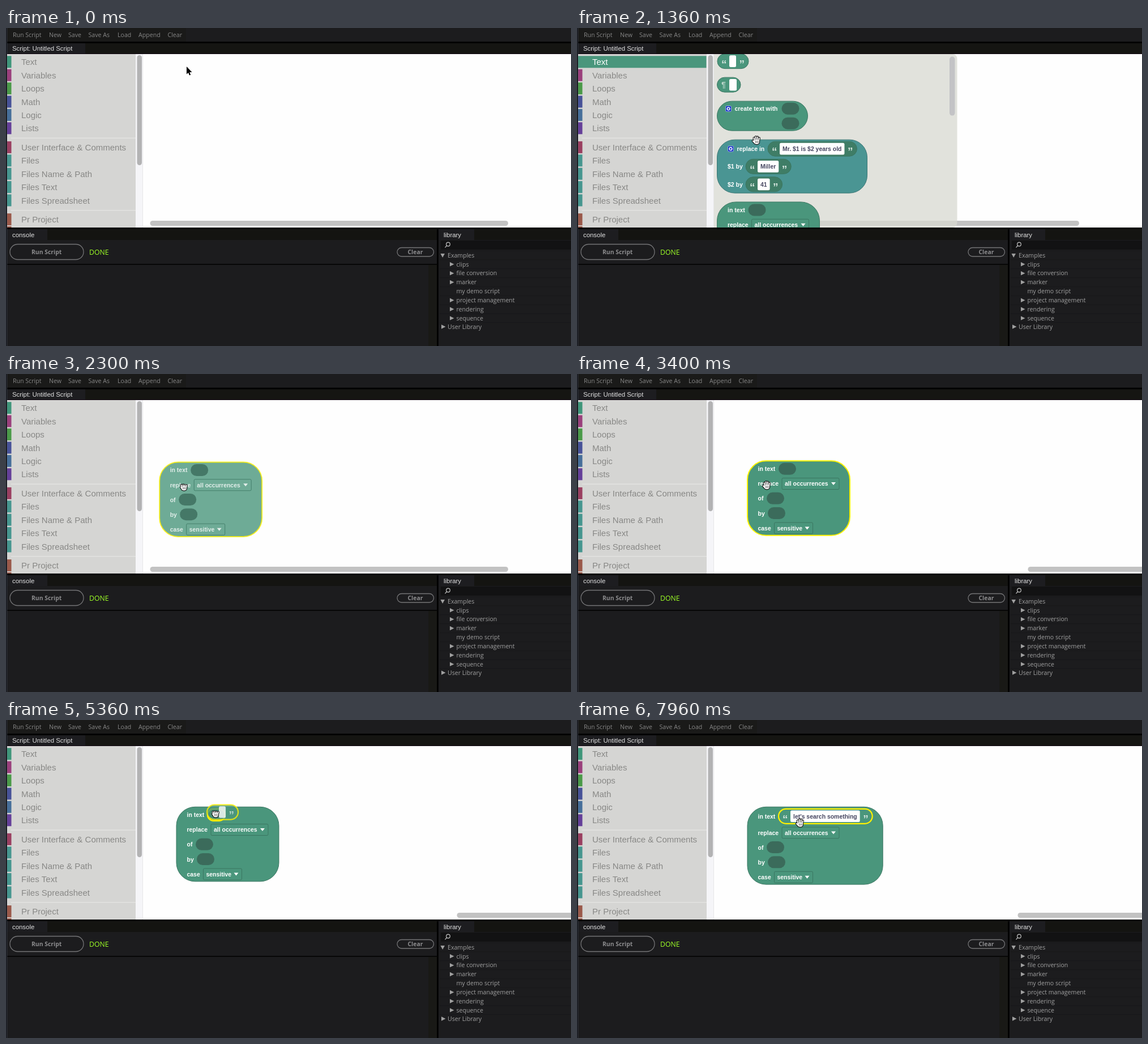
These frames come from a looping animation (998x561 px, 8000 ms). An HTML page with a canvas:

```html
<!DOCTYPE html>
<html lang="en">
<head>
<meta charset="utf-8">
<title>Block script editor</title>
<style>
html, body { margin: 0; width: 100%; height: 100%; overflow: hidden; background: #1c1c1e; }
canvas { display: block; width: 100vw; height: 100vh; }
</style>
</head>
<body>
<canvas id="stage" width="998" height="561"></canvas>
<script>
const ctx = document.getElementById('stage').getContext('2d');
const LOOP = 8000;
const SANS = '"Liberation Sans", Arial, sans-serif';
const UI = '"Open Sans", "Noto Sans", sans-serif';
const BLOCK_FONT = `bold 10.45px ${SANS}`;
const GREEN = '#4a967c', GREEN_EDGE = '#3a7661', SLOT = '#3b6b5b', TEAL = '#4a9593', YELLOW = '#fff200';
const PHRASE = "let's search something";

const clamp = v => Math.max(0, Math.min(1, v));
const progress = (t, from, to) => clamp((t - from) / (to - from));
const smooth = p => p * p * (3 - 2 * p);

// Position along [time, x, y] keys.
function along(keys, t, ease = p => p) {
  const next = keys.findIndex(k => k[0] > t);
  if (next === 0) return keys[0].slice(1);
  if (next < 0) return keys[keys.length - 1].slice(1);
  const a = keys[next - 1], b = keys[next];
  const p = ease(progress(t, a[0], b[0]));
  return [a[1] + (b[1] - a[1]) * p, a[2] + (b[2] - a[2]) * p];
}

function rect(x, y, w, h, fill) {
  ctx.fillStyle = fill;
  ctx.fillRect(x, y, w, h);
}

function round(x, y, w, h, r, fill, stroke, width = 1) {
  ctx.beginPath();
  ctx.roundRect(x, y, w, h, r);
  if (fill) { ctx.fillStyle = fill; ctx.fill(); }
  if (stroke) { ctx.strokeStyle = stroke; ctx.lineWidth = width; ctx.stroke(); }
}

// Text whose capitals are centred on y.
function text(str, x, y, font, fill) {
  ctx.font = font;
  ctx.fillStyle = fill;
  ctx.fillText(str, x, y + parseFloat(font.match(/[\d.]+(?=px)/)) * 0.36);
}

function poly(points, fill) {
  ctx.beginPath();
  points.forEach(([x, y]) => ctx.lineTo(x, y));
  ctx.closePath();
  ctx.fillStyle = fill;
  ctx.fill();
}

const label = (str, x, y) => text(str, x, y, BLOCK_FONT, '#fff');
const slot = (x, y) => round(x, y - 10.5, 31, 21, 10.5, SLOT);

function measure(str) {
  ctx.font = BLOCK_FONT;
  return ctx.measureText(str).width;
}

const quoteWidth = str => 43 + Math.max(12, str ? measure(str) + 10 : 0);

function quoteBlock(x, cy, str, { fill = GREEN, selected = false, caret = false } = {}) {
  const w = quoteWidth(str), mark = `bold 19px ${SANS}`;
  round(x, cy - 13, w, 26, 13, fill, selected ? YELLOW : GREEN_EDGE, selected ? 2.2 : 1);
  text('“', x + 7, cy + 4.5, mark, '#d6e6df');
  text('”', x + w - 16.5, cy + 4.5, mark, '#d6e6df');
  round(x + 21, cy - 10.3, w - 43, 20.6, 2.5, '#fff');
  text(str, x + 26, cy, BLOCK_FONT, '#454560');
  if (caret) rect(x + 26 + measure(str), cy - 6, 1, 12, '#333');
}

function dropdown(str, x, cy, w) {
  round(x, cy - 10, w, 20, 2, null, GREEN_EDGE);
  label(str, x + 5, cy);
  const ax = x + w - 10;
  poly([[ax - 4, cy - 2.5], [ax + 4, cy - 2.5], [ax, cy + 2.5]], '#fff');
}

// typed === null leaves the first input empty.
function replaceBlock(x, y, { selected = false, typed = null, alpha = 1, quote = {} } = {}) {
  const grow = typed === null ? 0 : 5.3;
  const w = typed === null ? 181 : Math.max(181, 73.5 + quoteWidth(typed));
  ctx.globalAlpha = alpha;
  round(x, y, w, 131.5 + grow, 33, GREEN, selected ? YELLOW : GREEN_EDGE, selected ? 2 : 1);
  label('in text', x + 18.5, y + 14 + grow / 2);
  if (typed === null) slot(x + 55, y + 14);
  else quoteBlock(x + 55, y + 16.5, typed, quote);
  y += grow;
  label('replace', x + 18.5, y + 40.3);
  dropdown('all occurrences', x + 61, y + 40.3, 101);
  label('of', x + 18.5, y + 66.4);
  slot(x + 34, y + 66);
  label('by', x + 18.5, y + 92.6);
  slot(x + 36, y + 92.2);
  label('case', x + 18.5, y + 118.7);
  dropdown('sensitive', x + 47.5, y + 118.7, 68);
  ctx.globalAlpha = 1;
}

function gear(x, y) {
  round(x - 5, y - 5, 10, 10, 2, '#1a35c8', '#a9b8e8', 0.8);
  ctx.beginPath();
  ctx.arc(x, y, 2.3, 0, 7);
  ctx.strokeStyle = '#fff';
  ctx.lineWidth = 1.5;
  ctx.stroke();
}

function flyout(scroll, quoteSelected) {
  round(242, 46, 429.5, 306, [0, 8, 8, 0], 'rgba(215,216,208,.75)');
  ctx.save();
  ctx.translate(0, -scroll);
  quoteBlock(248, 66, '', { selected: quoteSelected });
  round(247.5, 94.5, 41.5, 26, 13, GREEN, GREEN_EDGE);
  text('¶', 255, 107.5, `bold 14px ${SANS}`, '#b9d5ca');
  round(269, 97.3, 13, 20.6, 2.5, '#fff');

  round(247.5, 136.5, 160, 52, 26, GREEN, GREEN_EDGE);
  gear(267.5, 149.8);
  label('create text with', 278.5, 149.8);
  slot(361.5, 149.5);
  slot(361.5, 175.5);

  round(247.5, 204.5, 265, 94, 31, TEAL, '#3a7674');
  gear(271.5, 220.5);
  label('replace in', 282.5, 220.8);
  label('$1 by', 266, 252);
  label('$2 by', 266, 283.5);
  const nested = { fill: '#3f7d66' };
  quoteBlock(337, 220.5, 'Mr. $1 is $2 years old', nested);
  quoteBlock(298, 251.7, 'Miller', nested);
  quoteBlock(298, 283.2, '41', nested);

  replaceBlock(247.5, 314.3);
  replaceBlock(247.5, 462.3);
  ctx.restore();
  round(658, 48 + scroll * 0.34, 9.5, 104, 4.7, '#c3c3c6');
}

const CATEGORIES = [
  ['Text', 60, '#3f967a'], ['Variables', 83.4, '#9a3f7c'], ['Loops', 106.8, '#4a9a48'],
  ['Math', 130.2, '#475298'], ['Logic', 153.6, '#466f9a'], ['Lists', 177, '#653f99'],
  ['User Interface & Comments', 210.6, '#9a3f60'], ['Files', 234, '#46968f'],
  ['Files Name & Path', 257.4, '#46968f'], ['Files Text', 280.8, '#46968f'],
  ['Files Spreadsheet', 304.2, '#46968f'], ['Pr Project', 337.8, '#9a594a'], ['', 360.5, '#9a594a']
];

function toolbox(open) {
  rect(2, 46, 227, 306, '#d5d5d3');
  rect(229, 46, 13, 306, '#f5f5f8');
  rect(241, 46, 1, 306, '#e6e6e8');
  round(231.5, 48, 8.5, 194, 4.2, '#b3b3b4');
  rect(9, 193.5, 220, 1.5, '#e3e3e1');
  rect(9, 321, 220, 1.5, '#e3e3e1');
  CATEGORIES.forEach(([name, y, color], i) => {
    const active = open && i === 0;
    rect(2, y - 10.7, active ? 226.5 : 7.5, 21, active ? GREEN : color);
    text(name, 27, y, `15px ${SANS}`, active ? '#fff' : '#888886');
  });
}

function tab(str, x, y, w, h) {
  rect(x, y, w, h, '#1d1d20');
  text(str, x + 9, y + h / 2, `11.4px ${SANS}`, '#e2e2e2');
}

const TREE = ['clips', 'file conversion', 'marker', 'my demo script', 'project management', 'rendering', 'sequence'];

function chrome() {
  rect(0, 0, 998, 561, '#1c1c1e');
  const small = `10.6px ${UI}`, bold = `bold 10.4px ${UI}`;
  rect(2, 0, 316, 24, '#1a1a19');
  [['Run Script', 12], ['New', 76], ['Save', 110], ['Save As', 145.5], ['Load', 197], ['Append', 234], ['Clear', 285.5]]
    .forEach(([name, x]) => text(name, x, 12, small, '#868686'));
  rect(0, 24, 998, 3, '#030303');
  rect(0, 27, 998, 18, '#151512');
  tab('Script: Untitled Script', 2, 27, 138, 18);
  rect(0, 45, 998, 1, '#100510');

  rect(0, 352, 998, 3, '#030303');
  rect(0, 355, 998, 19, '#141411');
  tab('console', 2, 355, 71, 19);
  round(7, 381.5, 130, 27, 13.5, null, '#747476', 1.3);
  text('Run Script', 45, 395, bold, '#8c8c8e');
  text('DONE', 147, 395.3, `12.3px ${UI}`, '#9dff26');
  round(691, 387.5, 64.5, 15.5, 7.75, null, '#747476', 1.3);
  text('Clear', 709.5, 395, bold, '#8c8c8e');
  rect(0, 416, 761, 2, '#070707');
  rect(746, 418, 15, 143, '#191916');

  rect(761, 352, 3, 209, '#030303');
  tab('library', 764, 355, 63, 19);
  rect(768, 375, 230, 16, '#121213');
  ctx.strokeStyle = '#c4c4c4';
  ctx.lineWidth = 1.2;
  ctx.beginPath();
  ctx.arc(781, 381.5, 3.3, 0, 7);
  ctx.moveTo(778.6, 384);
  ctx.lineTo(775.5, 387.3);
  ctx.stroke();

  const gray = '#a0a0a0';
  const rightArrow = (x, y) => poly([[x, y - 3.7], [x + 7.5, y], [x, y + 3.7]], gray);
  for (let i = 0; i < 9; i++) rect(766, 392.5 + i * 15.85, 232, 1, '#18181a');
  poly([[767.5, 398], [775, 398], [771.2, 405]], gray);
  text('Examples', 780, 401, small, gray);
  TREE.forEach((name, i) => {
    const y = 416.8 + i * 15.85;
    if (i !== 3) rightArrow(784, y);
    text(name, 795.5, y, small, gray);
  });
  rightArrow(769, 527);
  text('User Library', 780, 527, small, gray);
  rect(0, 0, 1, 561, '#0a0a0c');
  rect(1, 0, 1, 561, '#343a45');
}

function arrow(x, y) {
  ctx.beginPath();
  [[0, 0], [0, 13.5], [3, 10.8], [5, 15.5], [7.2, 14.5], [5.2, 10], [9.5, 10]]
    .forEach(([dx, dy]) => ctx.lineTo(x + dx, y + dy));
  ctx.closePath();
  ctx.lineJoin = 'round';
  ctx.lineWidth = 2;
  ctx.strokeStyle = '#fff';
  ctx.stroke();
  ctx.fillStyle = '#000';
  ctx.fill();
}

function hand(x, y, closed) {
  const lift = closed ? 3.2 : 0;
  const fingers = [[-4.3, -4 + lift / 2], [-1.3, -6 + lift], [1.8, -5.6 + lift], [4.8, -3.6 + lift / 2]];
  ctx.save();
  ctx.translate(x, y);
  ctx.lineCap = 'round';
  for (const [color, width, palm] of [['#111', 4.2, 5.6], ['#fff', 2, 4.4]]) {
    ctx.strokeStyle = ctx.fillStyle = color;
    ctx.lineWidth = width;
    ctx.beginPath();
    fingers.forEach(([fx, fy]) => { ctx.moveTo(fx, fy); ctx.lineTo(fx * 0.8, 2); });
    ctx.moveTo(closed ? -5 : -6.2, 1.2);
    ctx.lineTo(-2.5, 5);
    ctx.stroke();
    ctx.beginPath();
    ctx.ellipse(0.4, 3.2, palm, palm - 0.6, 0, 0, 7);
    ctx.fill();
  }
  ctx.strokeStyle = '#333';
  ctx.lineWidth = 0.8;
  ctx.beginPath();
  for (const fx of [-1.5, 0.7, 2.9]) { ctx.moveTo(fx, 1.5); ctx.lineTo(fx, 4.5); }
  ctx.stroke();
  ctx.restore();
}

const POINTER = [
  [0, 319, 68], [300, 132, 61], [830, 132, 61], [1300, 317, 198], [1760, 317, 198],
  [1960, 281, 204], [2100, 281, 204], [2300, 314, 198.5], [2440, 335.5, 196.5],
  [3400, 335.5, 196.5], [3900, 122, 59], [4300, 122, 59], [4730, 262, 67], [4930, 262, 67],
  [5100, 304, 125], [5360, 370, 164.5], [5430, 373, 167], [5900, 373, 167], [6000, 383, 171],
  [7800, 391, 173], [7960, 394, 181.5]
];
const BLOCK_PATH = [[2100, 247, 160], [2300, 271, 155.5], [2460, 301, 153.3]];
const QUOTE_PATH = [[4930, 248, 66], [5100, 289, 124], [5360, 355, 162.5], [5430, 359, 166]];

function pointer(t) {
  if (t >= 6600 && t < 7800) return;
  const [x, y] = along(POINTER, t, t < 2100 ? smooth : undefined);
  const overBlocks = t < 2100 ? t > 830 && x > 242
    : t < 4130 ? x > 301
    : x > 242;
  const closed = (t > 2060 && t < 3100) || (t > 4780 && t < 5900);
  if (overBlocks) hand(x, y, closed);
  else arrow(x, y);
}

function workspace(t) {
  rect(242, 46, 756, 306, '#fefefe');
  const chars = Math.round(PHRASE.length * progress(t, 6570, 7660));
  const typed = t < 5660 ? null : PHRASE.slice(0, chars);
  const widened = typed ? Math.max(0, quoteWidth(typed) - 107.5) : 0;
  const barX = t < 2800 ? 254.5 : 796.5 - widened * 0.31;
  round(barX, 340, 632.5, 9, 4.5, '#c2c2c2');

  if (t >= 2100) {
    const [x, y] = along(BLOCK_PATH, t);
    const editing = t >= 6230 && t < 7800;
    replaceBlock(x, y, {
      selected: t < 4130,
      alpha: t < 2800 ? 0.8 : 1,
      typed,
      quote: { selected: true, caret: editing }
    });
  }

  const open = (t >= 500 && t < 2100) || (t >= 4130 && t < 4930);
  if (open) flyout(t < 2100 ? 154 * smooth(progress(t, 1320, 1630)) : 0, t >= 4780);

  if (t >= 4930 && t < 5660) {
    const [x, cy] = along(QUOTE_PATH, t);
    if (t > 5250) round(356, 156.8, 31, 21, 10.5, null, YELLOW, 2.5);
    ctx.globalAlpha = 0.8;
    quoteBlock(x, cy, '', { selected: true });
    ctx.globalAlpha = 1;
  }
  return open;
}

function frame(now) {
  const t = now % LOOP;
  chrome();
  ctx.save();
  ctx.beginPath();
  ctx.rect(2, 46, 996, 306);
  ctx.clip();
  const open = workspace(t);
  toolbox(open);
  ctx.restore();
  pointer(t);
}

const start = performance.now();
function tick() {
  frame(performance.now() - start);
  requestAnimationFrame(tick);
}
tick();
</script>
</body>
</html>
```
